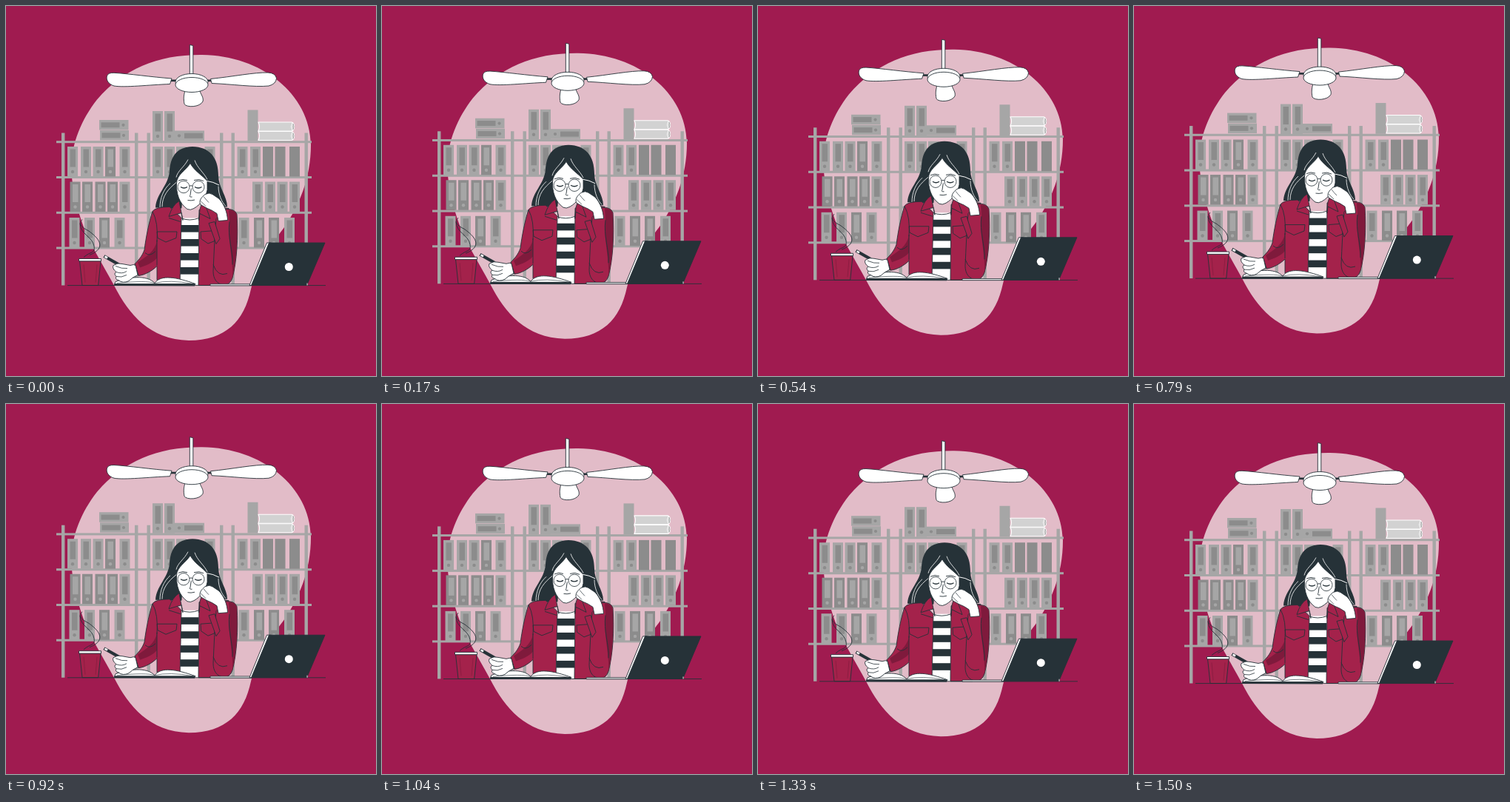
Animation, 500 px wide and 500 px high, one loop 1.54 s. Source, as an HTML page with a canvas:

```html
<!DOCTYPE html>
<html lang="en">
<head>
<meta charset="utf-8">
<title>Studying at the desk</title>
<style>
html, body { margin: 0; width: 100%; height: 100%; overflow: hidden; background: #a01b50; }
canvas { display: block; width: 100vw; height: 100vh; }
</style>
</head>
<body>
<canvas id="stage" width="500" height="500"></canvas>
<script>
const ctx = document.getElementById('stage').getContext('2d');
const BG = '#a01b50', PINK = '#e2bcc8', INK = '#263238', WHITE = '#fff';
const GRAY = '#a6a6a6', DARK_GRAY = '#8c8c8c', PALE = '#d2d2d2';
const RED = '#a4224b', SHADE = '#7f1a3c';
const LOOP = 1540, FLOAT = 1500, STEP = FLOAT / 36, RISE = 10, REST_Y = 0.5;

function shape(d, fill, stroke = INK, width = 0.9) {
  const path = new Path2D(d);
  if (fill) { ctx.fillStyle = fill; ctx.fill(path); }
  if (stroke) { ctx.strokeStyle = stroke; ctx.lineWidth = width; ctx.stroke(path); }
}
const line = (d, color = INK, width = 0.9) => shape(d, null, color, width);

function rect(x, y, w, h, color) {
  ctx.fillStyle = color;
  ctx.fillRect(x, y, w, h);
}

function oval(x, y, rx, ry, fill, stroke, width = 0.9) {
  ctx.beginPath();
  ctx.ellipse(x, y, rx, ry, 0, 0, Math.PI * 2);
  if (fill) { ctx.fillStyle = fill; ctx.fill(); }
  if (stroke) { ctx.strokeStyle = stroke; ctx.lineWidth = width; ctx.stroke(); }
}

function binder(x, y, dark = false) {
  const [body, mark] = dark ? [DARK_GRAY, GRAY] : [GRAY, DARK_GRAY];
  rect(x, y, 14, 40.5, body);
  rect(x + 3.5, y + 3.5, 7.5, 24, mark);
  oval(x + 7, y + 34, 2.2, 2.2, mark);
}

function lyingBinder(x, y, w, labelX, holeX) {
  rect(x, y, w, 13.5, GRAY);
  rect(labelX, y + 3.3, 25, 7, DARK_GRAY);
  oval(holeX, y + 6.8, 2.1, 2.1, DARK_GRAY);
}

function drawBlob() {
  shape(`M265 65.5 C345 66.5 411 118 412 187 C412 232 396 270 375 300 C352 330 339 352 331 382
    C322 425 297 451.5 247 451.5 C194 450 166 416 146.5 378 C131 349 111 318 102 290
    C93 262 88.5 240 88.5 217 C88.5 185 102 153 123 126 C159 84 206 65 265 65.5Z`, PINK, null);
}

function drawShelves() {
  for (const x of [75, 174, 190.5, 289, 304.5, 403.5]) rect(x, 171, 4.4, 206, GRAY);
  for (const y of [181.7, 229.5, 277.3, 325]) rect(68, y, 345, 3, GRAY);

  for (const x of [83, 101, 117.5, 134, 153.5]) binder(x, 189.5, x === 134);
  for (const x of [198, 214, 230, 268.5, 312.5, 330]) binder(x, 189.5);
  for (const x of [347, 363.5, 383]) rect(x, 189.5, 14, 40.5, DARK_GRAY);
  for (const x of [86.5, 103, 120.5, 137, 153.5]) binder(x, 237, x < 150);
  for (const x of [333, 350, 366.5, 383]) binder(x, 237);
  for (const x of [85.5, 106, 146.5, 314.5, 376]) binder(x, 285.5);
  for (const x of [126, 335, 355]) binder(x, 285.5, true);

  lyingBinder(126, 153.5, 39.5, 128.5, 158.5);
  lyingBinder(127, 167.5, 39, 129.5, 159);
  binder(198, 141.5);
  binder(214, 141.5);
  lyingBinder(228, 168, 40, 241, 234);
  rect(326.5, 140, 14, 41.7, GRAY);

  for (const y of [156.5, 169]) {
    shape(`M341 ${y} H386 Q389.5 ${y + 1} 389.5 ${y + 6} Q389.5 ${y + 11} 386 ${y + 12}
      H341 Q344 ${y + 6} 341 ${y}Z`, PALE, WHITE, 1.1);
    line(`M387 ${y + 1} Q384 ${y + 6} 387 ${y + 11}`, WHITE);
    line(`M388 ${y + 2} Q390 ${y + 6} 388 ${y + 10}`, DARK_GRAY, 0.7);
  }
}

function drawFan() {
  shape('M248.3 93 V52 L252.8 53 V93Z', WHITE);
  rect(223, 99, 54, 2.6, INK);
  shape(`M224 97.5 L221.5 105 C194 106 160 110 146 107.5 C138 105 135 99 136.5 94
    Q138 89.5 146 89.8 C166 91 197 95.5 224 97.5Z`, WHITE);
  shape(`M276.5 98 C306 95 336 89 354 89.5 Q364 90 365.5 97 Q365 105 355 107.5
    C336 109.5 304 105 278 104Z`, WHITE);
  shape('M242 114 C240.5 119 239.5 124 241 132 C244 137 262 136.5 266 128.5 C267.5 123 263 119 262 114Z', WHITE);
  oval(251, 102, 22, 11, WHITE, INK);
  oval(251, 106, 22, 10, WHITE, INK);
}

function drawHair() {
  shape(`M252 189.5 C230 190 222 204 221 223 C219 243 203 253 202 272 L234 273 L270 272
    L299 271 C299 257 287 244 287 229 C287 204 275 190 252 189.5Z`, INK, null);
  line('M222 239 C213 247 208 259 208 272 M230 238 C219 247 211 256 211 271', WHITE, 0.8);
  line('M287 243 C287 255 292 265 297 270', WHITE, 0.8);
}

function drawFace() {
  shape('M238 265 H266 V289 H236Z', PINK, null);
  shape(`M249 212 C243 222 231 227 230.5 239 C230 253 234 266 245 274 Q249 276 254 273
    C264 267 270 258 272 248 L272 236 C265 228 254 222 249 212Z`, WHITE);
  line('M246 207 C241 217 232 222 230 231 M255 208 C258 218 268 225 272 234', WHITE, 0.8);
  for (const x of [240, 260]) oval(x, 244, 8, 8.2, null, INK, 0.8);
  line('M248 243 Q250 241 252 243');
  line('M236 244 Q240.5 247 245 244 M255 244 Q260 247 264.5 244', INK, 1.3);
  line('M233 235.5 Q239 232.5 245 235 M254 235 Q261 232.5 267 236');
  line('M250.3 246 L249 255 Q247 258 251.5 257.5 M245.5 262 Q250 263 255 261.5');
  line('M271.5 236 Q280 237 288 241.5', WHITE, 1);
}

function drawShirt() {
  rect(235.5, 286, 25, 91, WHITE);
  for (let y = 295.5; y < 360; y += 19) rect(235.5, y, 25, 9.6, INK);
  line('M236 286 Q248 291 261 286');
}

function drawJacket() {
  // Left sleeve and front
  shape(`M221 271 Q202 271 198 277 C193 292 189 313 187 329 C184 338 178 344 174 348
    L179 364 C188 363 198 357 204 351 V370 L235 377 L237 286 L226 275Z`, RED);
  shape('M204 317 C201 331 190 338 178 346 L181 353 C190 350 199 346 204 340Z', SHADE, null);
  line('M204 316 V350 M198 277 Q206 292 204 318 M174 348 L179 364 M188 333 Q194 339 202 331');
  line('M220 286 L236 291 M204 304.5 H231 L230 313 L216 318.5 L205 313Z');
  shape('M234 263 Q225 268 220 284 L237 279 L239 289 L236 274Z', RED);

  // Right front and propped sleeve
  shape('M261 275 L278 271 L301 273 L290 377 H260Z', RED);
  shape('M265 265 L271 273 L276 287 L262 280 L260.5 289 L262 274Z', RED);
  line('M263 304.5 L283 303 L282 317 L273 320.5 L263.5 314Z');
  shape(`M297 274 Q309 273 312 281 C314 312 312 344 306 367 Q303 376 295 376.5
    C285 376 280 368 280 358 C281 335 282 310 284 287Z`, RED);
  shape(`M301 275 Q311 275 312 283 C313 314 312 344 306 367 C308 345 299 318 302 291Z`, SHADE, null);
  line('M302 291 C299 312 307 330 306 349 M280 349 Q286 366 299 361');
  shape('M274 293 L282 291 L289 314 L284 321Z', RED);
}

function drawRestingHand() {
  shape(`M263 268 C260 263 264 258 269 254 Q275 251 279 254 L288 260 C295 268 299 278 299.5 289
    L287 290 L285 280 Q278 275 272 273Z`, WHITE);
  line('M263 263 L270 270 M267 257 Q271 262 274 265', INK, 0.7);
}

function drawCup() {
  shape('M99.5 344 H128 L124.7 377 H103Z', RED);
  shape('M98.5 341 H128.5 V344.3 H98.5Z', WHITE);
  line('M105 349 L107 373 M123 349 L121 373', SHADE, 0.6);
  line('M113 336 C138 326 124 312 111 303 C99 297 99 293 103 288');
  line('M105 339 C114 331 121 334 119 324 C117 311 100 308 100 293');
}

function drawDesk() {
  line('M83 377.1 H432');
  shape('M276 375.3 H332 V377.4 H276Z', WHITE);
  shape('M146 377 L148 372 C165 366 190 362 201 374 C209 362 231 366 256 375 L255 377.5Z', WHITE);
  line('M201 374 Q190 370 150 374 M201 374 Q220 369 253 375', INK, 0.6);
  rect(146.5, 374.6, 108.5, 2.8, INK);
}

function drawWritingHand() {
  line('M132.5 337.5 L158 352', INK, 4.2);
  line('M133.5 338 L137 340', WHITE, 2.6);
  shape(`M145 350 Q151 346 157 348 L168 350 Q173 348 175 350 L178 363 Q171 366 166 371
    Q158 375 152 370 Q147 369 149 365 Q145 361 149 359 Q143 354 145 350Z`, WHITE);
  line('M149 359 Q157 362 163 358 M149 365 Q156 367 163 363 M148 351 Q157 355 164 354', INK, 0.8);
}

function drawLaptop() {
  shape('M352.5 319.5 H358 L333 377 H329Z', WHITE);
  shape('M355.5 319.5 H431 L406.5 377 H331.5Z', INK);
  line('M407 374 V377', WHITE, 0.8);
  oval(382.3, 352, 5.5, 5.5, WHITE);
}

function drawScene(offset) {
  ctx.setTransform(1, 0, 0, 1, 0, 0);
  rect(0, 0, 500, 500, BG);
  ctx.translate(0, REST_Y + offset);
  ctx.lineJoin = 'round';
  drawBlob();
  drawShelves();
  drawFan();
  drawHair();
  drawFace();
  drawShirt();
  drawJacket();
  drawRestingHand();
  drawCup();
  drawDesk();
  drawWritingHand();
  drawLaptop();
}

// Linear rise and fall, advanced at 24 steps per second
function floatOffset(time) {
  const tick = Math.floor((time % LOOP + 2) / STEP);
  const phase = Math.min(tick / 36, 1);
  return -RISE * (1 - Math.abs(1 - 2 * phase));
}

const start = performance.now();
function render(now) {
  drawScene(floatOffset(Math.max(0, now - start)));
  requestAnimationFrame(render);
}
render(start);
</script>
</body>
</html>
```
